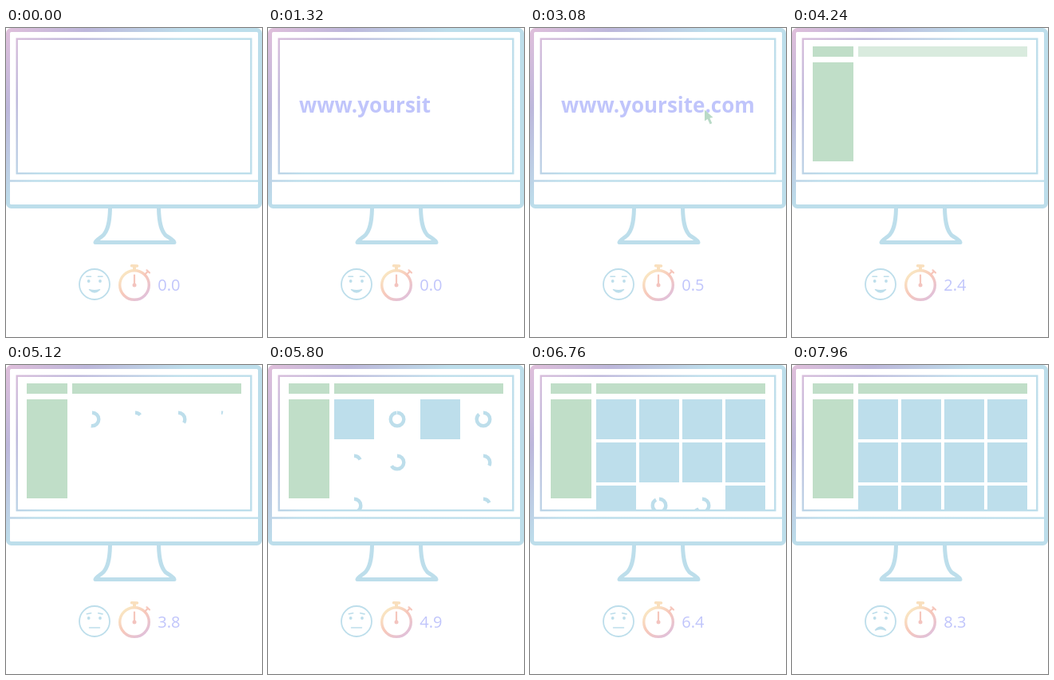
These frames come from a looping animation (321 px wide and 387 px high, 10 s). An HTML page:

```html
<!DOCTYPE html>
<html lang="en">
<head>
<meta charset="utf-8">
<title>Page load</title>
<style>
  html, body { margin: 0; width: 100%; height: 100%; overflow: hidden; background: #fff; }
  svg { display: block; width: 321px; height: 387px; }
  text { font-family: "Open Sans", sans-serif; fill: #c0c5fb; white-space: pre; }
  #url { font-size: 26px; font-weight: 700; }
  #count { font-size: 20px; }
  .line { fill: none; stroke: #bddeeb; stroke-linecap: round; stroke-linejoin: round; }
  .tile { fill: #bddeeb; }
  .block { fill: #c0dec8; }
</style>
</head>
<body>
<svg viewBox="0 0 321 387">
  <defs>
    <linearGradient id="edge" gradientUnits="userSpaceOnUse" x1="0" y1="0" x2="114" y2="114">
      <stop offset="0" stop-color="#e0bfdb"/>
      <stop offset=".45" stop-color="#bdb7db"/>
      <stop offset="1" stop-color="#bddeeb"/>
    </linearGradient>
    <linearGradient id="warm" gradientUnits="userSpaceOnUse" x1="148" y1="304" x2="176" y2="338">
      <stop offset="0" stop-color="#faeac3"/>
      <stop offset=".5" stop-color="#f7c8bb"/>
      <stop offset="1" stop-color="#dfc0dc"/>
    </linearGradient>
    <clipPath id="screen"><rect x="14" y="14" width="293" height="167"/></clipPath>
  </defs>

  <g id="page" clip-path="url(#screen)">
    <rect class="block" id="logo" x="26" y="23" width="51" height="13"/>
    <rect class="block" id="side" x="26" y="43" width="51" height="124"/>
    <rect class="block" id="bar" x="83" y="23" width="212" height="13"/>
  </g>

  <g fill="none" stroke="url(#edge)">
    <rect x="2.5" y="2.5" width="316" height="221" rx="4" stroke-width="5"/>
    <rect x="13.7" y="13.7" width="293.6" height="168.4" stroke-width="2.4"/>
    <path d="M5 191.5L316 191.6" stroke-width="2.4"/>
  </g>
  <path class="line" stroke-width="5" d="M130.5 226C130 246 127 254 122 259.500C119 262.500 112 266 112 268.500H211C211 266 204 262.500 200 259.500C195 254 192 246 191.500 226"/>

  <g class="line" stroke-width="1.8">
    <circle cx="111" cy="321" r="19"/>
    <path id="brows" stroke-width="1.6"/>
    <path id="mouth" stroke-width="1.5"/>
    <g fill="#bddeeb" stroke="none"><circle cx="103.700" cy="317" r="1.900"/><circle cx="118" cy="317" r="1.900"/></g>
  </g>

  <g fill="none" stroke="url(#warm)">
    <circle cx="161" cy="322" r="18.300" stroke-width="3.400"/>
    <path d="M161 298V304" stroke="#f9dfbd" stroke-width="4"/>
    <path d="M157.500 297.800L164.500 297.900" stroke="#f9dfbd" stroke-width="3.500" stroke-linecap="round"/>
    <path d="M174 309L178 304.500M176.500 303.300L180 306.500" stroke="#f6c6bb" stroke-width="2.200" stroke-linecap="round"/>
    <path d="M161 309.500V322" stroke="#f5c6bc" stroke-width="2.200" stroke-linecap="round"/>
    <circle cx="161" cy="322" r="2.500" fill="#f3c4bf" stroke="none"/>
  </g>

  <text id="count" x="190.300" y="328.500"></text>
  <text id="url" x="39" y="106"></text>
  <path id="cursor" fill="#b9dac7" d="M0 0L10.500 9.500L6.400 10.200L9.300 16.800L6.600 18L3.700 11.400L0 14Z"/>
</svg>
<script>
  const LOOP = 10000, STEP = 40, SPIN = 800;
  const URL_TEXT = "www.yoursite.com";
  const $ = id => document.getElementById(id);
  const clamp = v => Math.min(1, Math.max(0, v));

  // Spinner start times by row and column
  const starts = [
    [4700, 5010, 4850, 5090],
    [5656, 5270, 5850, 5535],
    [5460, 6024, 6216, 5656]
  ];

  // Each block shows faintly first, then at full strength
  const blocks = [["logo", 3480, 3600], ["side", 3920, 4040], ["bar", 4200, 4440]];

  const faces = [
    { at: 0, brows: "M101 311.200H106.500M115.500 311.200H121",
      mouth: "M104.500 327.700Q111 330 117.500 327.700Q111 334 104.500 327.700Z", fill: true },
    { at: 5000, brows: "M101.300 311.700L106.700 310.800M115.700 310.800L121 311.900",
      mouth: "M104.500 329H117.500" },
    { at: 7500, brows: "M101.300 311.300L106.500 309.500M115.800 309.500L120.800 311.500",
      mouth: "M104.500 332Q111 324.500 117.500 332Q111 328.800 104.500 332Z", fill: true }
  ];

  function add(tag, attrs) {
    const el = document.createElementNS("http://www.w3.org/2000/svg", tag);
    for (const k in attrs) el.setAttribute(k, attrs[k]);
    return $("page").appendChild(el);
  }

  const cells = starts.flatMap((row, r) => row.map((start, c) => {
    const x = 83 + 54 * c, y = 43 + 54 * r, cx = x + 25, cy = y + 25;
    return {
      start,
      tile: add("rect", { class: "tile", x, y, width: 50, height: 50 }),
      ring: add("circle", { cx, cy, r: 8.3, fill: "none", stroke: "#bddeeb", "stroke-width": 4.4,
        pathLength: 100, transform: `rotate(-90 ${cx} ${cy})` })
    };
  }));

  const show = (el, on) => el.setAttribute("visibility", on ? "visible" : "hidden");

  function typed(t) {
    const half = s => Math.min(8, Math.max(0, Math.floor((t - s) / 120) + 1));
    return half(80) + half(1080);
  }

  function draw(t) {
    const url = $("url");
    url.textContent = t < 3440 ? URL_TEXT.slice(0, typed(t)) : "";
    url.style.fill = t >= 2440 && t < 2480 ? "#80ffdf" : "";

    const away = 1 - clamp((t - 2200) / 200) + clamp((t - 3120) / 200);
    $("cursor").setAttribute("transform", `translate(${219 + 76.5 * away} ${102.5 + 33.5 * away})`);
    show($("cursor"), t >= 2200 && t < 3360);

    const tenths = Math.min(83, Math.max(0, Math.floor((t - 2735) / 62.5)));
    $("count").textContent = (tenths / 10).toFixed(1);

    for (const [id, faint, full] of blocks)
      $(id).setAttribute("opacity", t < faint ? 0 : t < full ? 0.6 : 1);

    for (const { start, tile, ring } of cells) {
      const p = (t - start) / SPIN;
      show(tile, p >= 1);
      show(ring, p > 0 && p < 1);
      ring.setAttribute("stroke-dasharray", `${100 * clamp(p)} 200`);
    }

    const face = faces.filter(f => t >= f.at).pop();
    $("brows").setAttribute("d", face.brows);
    $("mouth").setAttribute("d", face.mouth);
    $("mouth").setAttribute("fill", face.fill ? "#bddeeb" : "none");
  }

  const t0 = performance.now();
  function tick() {
    const t = (performance.now() - t0) % LOOP;
    draw(Math.floor(t / STEP) * STEP);
    requestAnimationFrame(tick);
  }
  tick();
</script>
</body>
</html>
```
